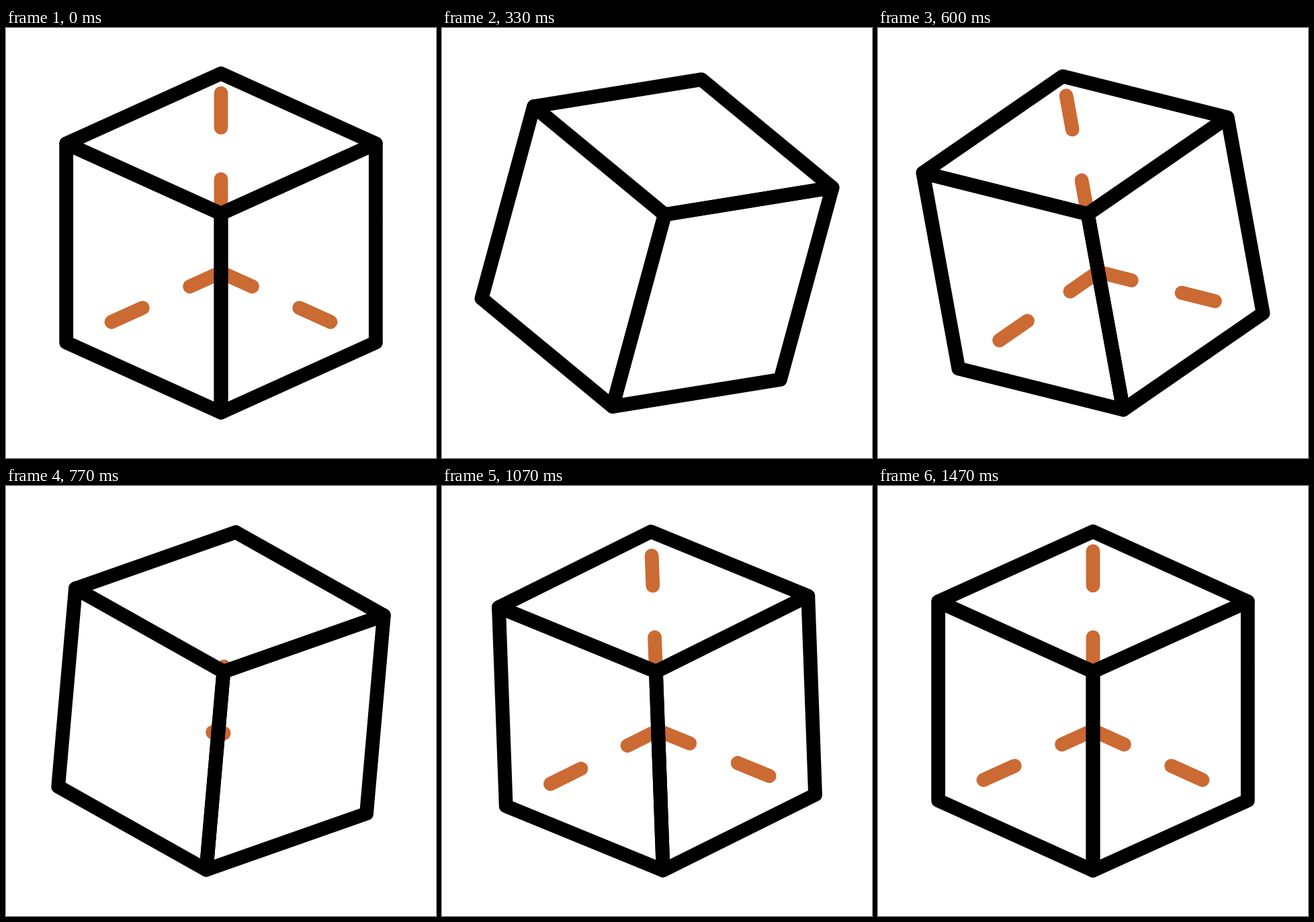
Write an HTML page with a canvas that moves like this. It is 640x640 px and loops after 1.67 s.

```html
<!DOCTYPE html>
<html lang="en">
<head>
<meta charset="utf-8">
<title>Rocking cube</title>
<style>
  html, body { margin: 0; width: 100%; height: 100%; overflow: hidden; background: #fff; }
  canvas { display: block; width: 640px; height: 640px; }
</style>
</head>
<body>
<canvas id="stage" width="640" height="640"></canvas>
<script>
const ctx = document.getElementById('stage').getContext('2d');
const LOOP = 1670, LAST_STEP = 44;

// Turning points of the swing, in steps of 1/30 s, and the angle at each
const TURNS = [0, 10, 18, 23.6, 32, 44];
const ANGLES = [0, 15.2, -10.3, 5.35, -2.08, 0];
// The hidden edges alternate between drawn and withdrawn at these steps
const REVEALS = [3, 10, 18, 23.8, 35.7];

const clamp = u => Math.min(1, Math.max(0, u));

function ease(u) {
  const v = clamp(u) ** 0.82;
  return v * v * (3 - 2 * v);
}

function tween(steps, valueOf, step) {
  let i = 1;
  while (i < steps.length - 1 && step > steps[i]) i++;
  const u = ease((step - steps[i - 1]) / (steps[i] - steps[i - 1]));
  return valueOf(i - 1) * (1 - u) + valueOf(i) * u;
}

// Projects a corner of the unit cube; each coordinate is -0.5 or 0.5
const project = ([x, y, z]) => [(x - y) * 230.3, (x + y) * 104.2 - z * 296];

function stroke(points, color, closed) {
  ctx.strokeStyle = color;
  ctx.beginPath();
  points.forEach(([x, y]) => ctx.lineTo(x, y));
  if (closed) ctx.closePath();
  ctx.stroke();
}

function drawFace(axis) {
  const corners = [0, 1, 2, 3].map(i => {
    const corner = [0.5, 0.5, 0.5];
    corner[(axis + 1) % 3] = i === 1 || i === 2 ? 0.5 : -0.5;
    corner[(axis + 2) % 3] = i > 1 ? 0.5 : -0.5;
    return project(corner);
  });
  stroke(corners, '#000', true);
}

function drawHiddenEdge(axis, shown) {
  const end = [-0.5, -0.5, -0.5];
  // The upright edge only starts where it emerges behind the front corner
  const [x0, y0] = project(axis === 2 ? [0.5, 0.5, 0.5] : end);
  end[axis] = 0.5;
  const [x1, y1] = project(end);
  stroke([[x0, y0], [x0 + (x1 - x0) * shown, y0 + (y1 - y0) * shown]], '#cb6a33');
}

function draw(now) {
  const ticks = Math.floor((now % LOOP) / 10);
  const step = Math.min(LAST_STEP, Math.floor((3 * ticks + 1) / 10));
  const angle = tween(TURNS, i => ANGLES[i], step);
  const shown = tween(REVEALS, i => 1 - i % 2, step);

  ctx.setTransform(1, 0, 0, 1, 0, 0);
  ctx.clearRect(0, 0, 640, 640);
  ctx.translate(320, 320);
  ctx.rotate(angle * Math.PI / 180);
  ctx.lineWidth = 20.8;
  ctx.lineCap = ctx.lineJoin = 'round';

  const axes = [0, 1, 2];
  ctx.setLineDash([51, 77]);
  if (shown > 0) axes.forEach(axis => drawHiddenEdge(axis, shown));
  ctx.setLineDash([]);
  axes.forEach(drawFace);
}

const start = performance.now();
function tick() {
  draw(performance.now() - start);
  requestAnimationFrame(tick);
}
tick();
</script>
</body>
</html>
```
